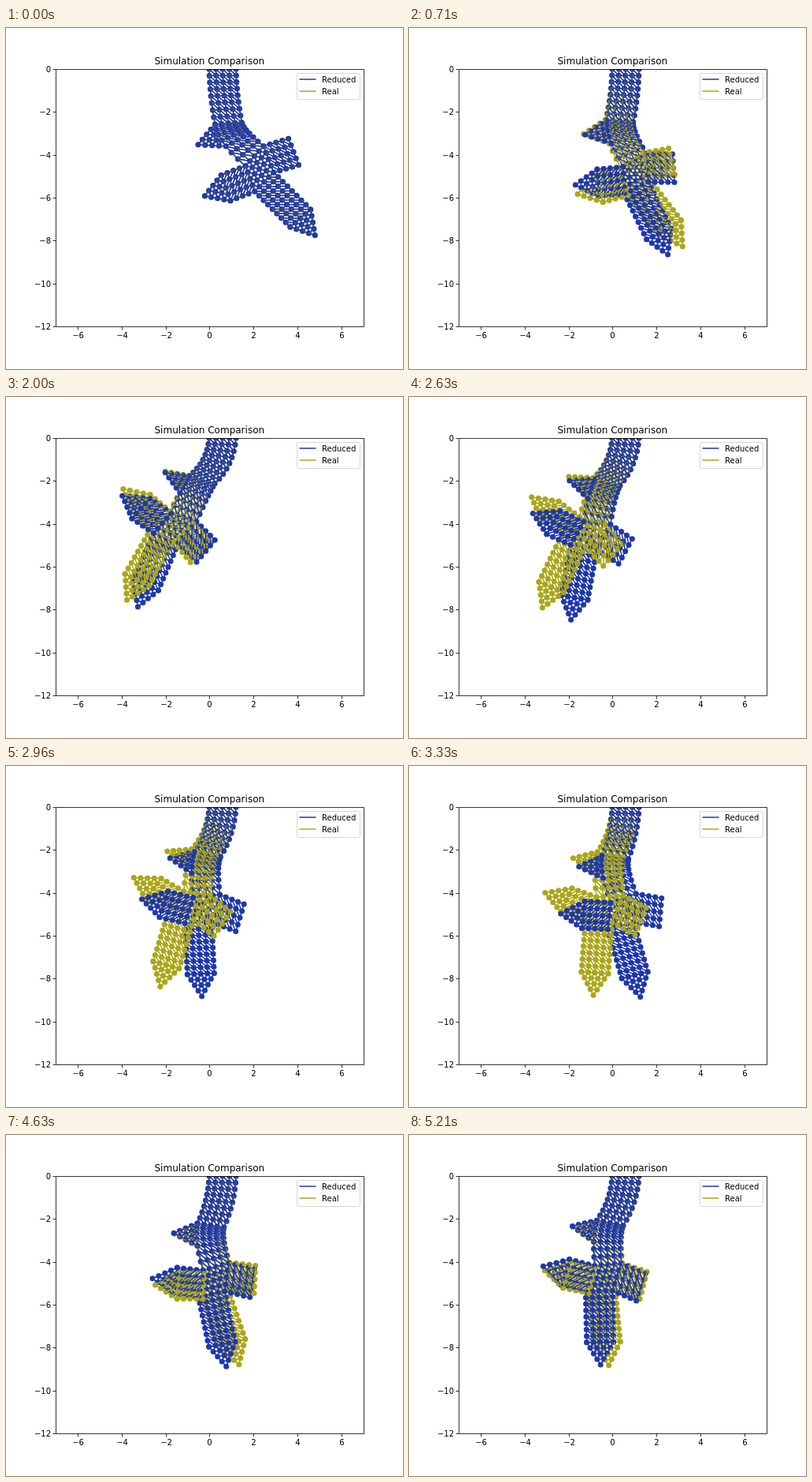
These frames come from a looping animation (504 by 432 pixels, 5250 ms). An HTML page with a canvas:

```html
<!DOCTYPE html>
<html lang="en">
<head>
<meta charset="utf-8">
<title>Simulation Comparison</title>
<style>
  html, body { margin: 0; width: 100%; height: 100%; overflow: hidden; background: #fff; }
  canvas, svg { position: absolute; left: 0; top: 0; width: 504px; height: 432px; }
  text { font: 10px "DejaVu Sans", sans-serif; fill: #000; }
  .title { font-size: 12px; text-anchor: middle; }
  .axes { fill: none; stroke: #000; stroke-width: .8; }
  .key { stroke-width: 1.5; }
  .real { stroke: #aca61a; }
  .reduced { stroke: #1f38ab; }
</style>
</head>
<body>
<canvas width="504" height="432"></canvas>
<svg viewBox="0 0 504 432">
  <path class="axes" d="M63.5 52.5H454.5V378.5H63.5Z"/>
  <g id="ticks"></g>
  <text class="title" x="258.3" y="46">Simulation Comparison</text>
  <rect x="369.5" y="57.5" width="80" height="33" rx="2" fill="#fff" fill-opacity=".8" stroke="#ccc" stroke-opacity=".8"/>
  <path class="key reduced" d="M372.5 65h21"/>
  <path class="key real" d="M372.5 80h21"/>
  <text x="401" y="69">Reduced</text>
  <text x="401" y="84">Real</text>
</svg>
<script>
const LOOP = 5250, STEPS = 126, DEG = Math.PI / 180;
const TOP = [275, 52], HALF = 17, SIDE = 33, TIP = 28.5;

// Turning points of the swing: [time in ms, angle in degrees].
const whole = [[0, 45], [2000, -23], [3750, 22], [5750, -3]];
const bodies = [
  {
    color: '#aca61a',
    stem: [[0, 45], [1900, -25], [4200, 16], [5900, -5]],
    tail: [[350, 45], [2150, -31], [4450, 20], [6000, -10]]
  },
  { color: '#1f38ab', stem: whole, tail: whole }
];

const mix = (a, b, k) => a + (b - a) * k;
const mixPt = (p, q, k) => [mix(p[0], q[0], k), mix(p[1], q[1], k)];
// Angles are measured from straight down, positive to the right.
const lean = (p, q) => Math.atan2(q[0] - p[0], q[1] - p[1]);
const down = (p, a, d) => [p[0] + d * Math.sin(a), p[1] + d * Math.cos(a)];
const across = (p, a, d) => [p[0] + d * Math.cos(a), p[1] - d * Math.sin(a)];
const bend = (p, c, q, k) => mixPt(mixPt(p, c, k), mixPt(c, q, k), k);
const range = n => Array.from({ length: n }, (_, i) => i);

function swing(turns, t) {
  const i = turns.findIndex(turn => turn[0] > t);
  if (i === 0) return turns[0][1];
  const [t0, a] = turns[i - 1], [t1, b] = turns[i];
  return mix(a, b, (1 - Math.cos(Math.PI * (t - t0) / (t1 - t0))) / 2);
}

// Rows of five nodes along the spine, bent by the swing of stem and tail.
function spineRows(stem, tailDeg) {
  const a = (-19 + .4 * stem + .0035 * stem * stem) * DEG;
  const b = (.95 * stem - 4) * DEG;
  const turn = (.9 * tailDeg - 20) * DEG;
  const tail = tailDeg * DEG;
  const shoulder = down(TOP, a, 62.5 + .15 * stem);
  const hubTop = down(shoulder, b, 53);
  const hubEnd = down(hubTop, turn, 35);
  const end = down(hubEnd, tail, 65);
  const hub = (b + tail) / 2 + .1;
  const c1 = down(TOP, a * .2, 33), c2 = down(shoulder, a * 1.2, 15);
  const parts = [
    [8, k => bend(TOP, c1, shoulder, k), 0, a * .6],
    [7, k => bend(shoulder, c2, hubTop, k), a * .6, hub],
    [4, k => mixPt(hubTop, hubEnd, k), hub, tail],
    [8, k => mixPt(hubEnd, end, k), tail, tail * .9]
  ];
  const row = (c, n) => range(5).map(i => across(c, n, (i / 2 - 1) * HALF));
  const rows = [row(TOP, 0)];
  for (const [n, at, n0, n1] of parts)
    for (let i = 1; i <= n; i++) rows.push(row(at(i / n), mix(n0, n1, i / n)));
  return { rows, turn };
}

// Rows shrinking from a five-node edge to its apex.
function wedge(edge, apex) {
  return range(5).map(j => {
    const s = mixPt(edge[0], apex, j / 4), e = mixPt(edge[4], apex, j / 4);
    return range(5 - j).map(i =>
      j ? mixPt(s, e, i / Math.max(1, 4 - j)) : edge[i]);
  });
}
const arm = (edge, a, d) =>
  range(5).map(j => edge.map(p => across(p, a, d * j / 4)));

// Every node with the neighbours it is joined to.
function link(rows) {
  return rows.flatMap((row, j) => row.map((p, i) => {
    const up = rows[j - 1] || [];
    const narrows = up.length > row.length;
    const ends = [row[i - 1], up[i], up[narrows ? i + 1 : i - 1]];
    return { p, ends: ends.filter(Boolean) };
  }));
}

function build(body, t) {
  const { rows, turn } = spineRows(swing(body.stem, t), swing(body.tail, t));
  const side = (from, col) => rows.slice(from, from + 5).map(r => r[col]);
  const fin = side(8, 0), end = rows[rows.length - 1];
  const tilt = turn * .9 + .04;
  const left = arm(side(15, 0), tilt, -SIDE);
  const right = arm(side(15, 4), turn - .07, SIDE);
  const out = left[4];
  return [
    rows,
    wedge(fin, across(fin[2], lean(fin[0], fin[4]), -TIP)),
    left,
    wedge(out, across(out[2], tilt, -TIP)),
    right,
    wedge(end, down(end[2], lean(end[0], end[4]) - Math.PI / 2, TIP))
  ].flatMap(link);
}

const ctx = document.querySelector('canvas').getContext('2d');
ctx.beginPath();
ctx.rect(63, 52, 391, 326);
ctx.clip();
ctx.lineWidth = 1.5;

function drawNode({ p, ends }, color) {
  ctx.strokeStyle = ctx.fillStyle = color;
  ctx.beginPath();
  for (const q of ends) {
    ctx.moveTo(...p);
    ctx.lineTo(...q);
  }
  ctx.stroke();
  ctx.beginPath();
  ctx.arc(...p, 3.5, 0, 2 * Math.PI);
  ctx.fill();
}

// Both bodies are painted element by element, so they interleave.
function paint(t) {
  ctx.clearRect(0, 0, 504, 432);
  const meshes = bodies.map(b => build(b, t));
  meshes[0].forEach((_, i) =>
    bodies.forEach((b, k) => drawNode(meshes[k][i], b.color)));
}

function drawTicks() {
  let s = '';
  const label = v => String(v).replace('-', '\u2212');
  for (let v = -6; v <= 6; v += 2) {
    const x = Math.round(63 + (v + 7) * 27.9) + .5;
    s += `<path class="axes" d="M${x} 378.5v4"/><text x="${x}" y="393" text-anchor="middle">${label(v)}</text>`;
  }
  for (let v = 0; v >= -12; v -= 2) {
    const y = Math.round(52 - v * 27.18) + .5;
    s += `<path class="axes" d="M63.5 ${y}h-4"/><text x="57" y="${y + 3.5}" text-anchor="end">${label(v)}</text>`;
  }
  document.getElementById('ticks').innerHTML = s;
}

let shown = -1;
const start = performance.now();

function draw() {
  const ms = (performance.now() - start) % LOOP;
  const step = Math.floor((ms + 4) * STEPS / LOOP) % STEPS;
  if (step !== shown) {
    shown = step;
    paint(step * LOOP / STEPS);
  }
  requestAnimationFrame(draw);
}
drawTicks();
draw();
</script>
</body>
</html>
```
